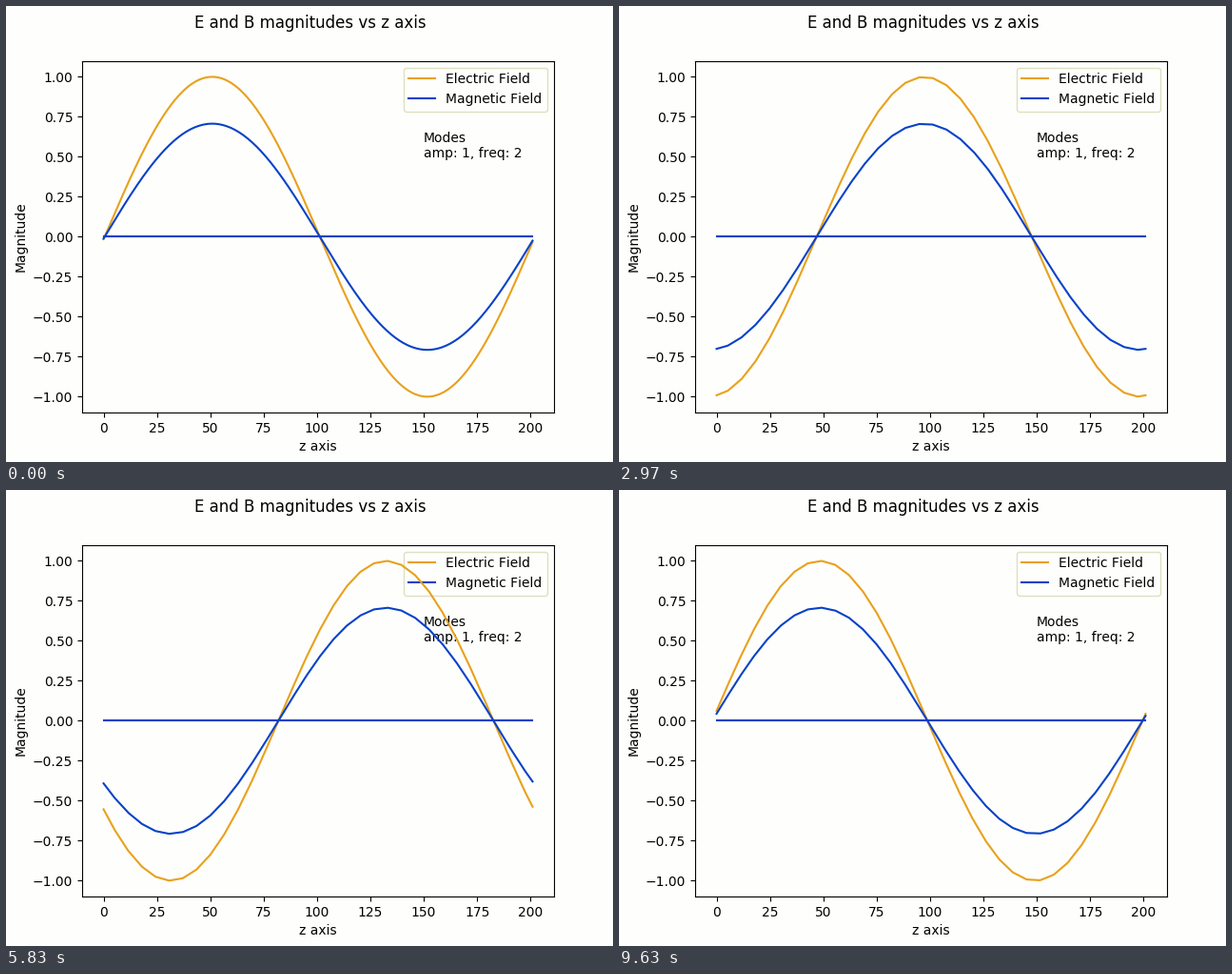
A matplotlib script that plays this animation: 638x479 px, repeating every 9.66 s.

```python
import numpy as np
import matplotlib.pyplot as plt
from matplotlib.animation import FuncAnimation
from matplotlib.lines import Line2D

W, H, DPI = 638, 479, 100
FRAMES, LOOP_MS = 290, 9660
PERIOD = 201.6       # wavelength along z
PITCH = 6.4          # spacing of the samples fed in at z = 0
PAPER, ORANGE, BLUE = "#fefefc", "#e8a11c", "#0842c8"

# Distance travelled by the wave, which drifts slightly in speed.
KEY_FRAMES = [0, 38, 89, 145, 205, 253, 289]
KEY_SHIFTS = [0.5, 109.7, 248.5, 401.4, 568.8, 702.0, 804.4]

# The starting wave is finely sampled, the incoming wave coarsely.
samples = np.concatenate([np.arange(-140, 0) * PITCH, np.arange(0, 203)])
wave = np.sin(2 * np.pi * samples / PERIOD)
z = np.linspace(0, 201, 805)

plt.rcParams["font.family"] = "DejaVu Sans"
plt.rcParams["text.kerning_factor"] = 6
fig = plt.figure(figsize=(W / DPI, H / DPI), dpi=DPI, facecolor=PAPER)
ax = fig.add_axes([80 / W, (H - 427.2) / H, 496 / W, 369.6 / H], facecolor=PAPER)
margin = 201 * 0.05
ax.set_xlim(-margin, 201 + margin)
ax.set_ylim(-1.1, 1.1)
ax.set_xticks(range(0, 201, 25))
ax.set_yticks(np.linspace(-1, 1, 9))
ax.set_xlabel("z axis")
ax.set_ylabel("Magnitude")
fig.suptitle("E and B magnitudes vs z axis", x=320 / W, y=1 - 8.6 / H)
ax.text(150, 0.494, "Modes\namp: 1, freq: 2")


def field(color, label, order):
    """Return a moving curve together with its resting zero line."""
    ax.plot([0, 201], [0, 0], color=color, lw=1.5, zorder=order)
    return ax.plot([], [], color=color, lw=1.5, label=label, zorder=order)[0]


electric = field(ORANGE, "Electric Field", 10)
magnetic = field(BLUE, "Magnetic Field", 11)

legend = ax.legend(loc="upper right", facecolor=PAPER, edgecolor="#d8d8b4")
legend.set_zorder(4)
fig.add_artist(Line2D([0, 1], [0.5 / H] * 2, color="#b0b0a8", lw=0.72))


def update(n):
    shift = np.interp(n, KEY_FRAMES, KEY_SHIFTS)
    e = np.interp(z - shift, samples, wave)
    electric.set_data(z, e)
    magnetic.set_data(z, e / np.sqrt(2))
    return electric, magnetic


anim = FuncAnimation(fig, update, frames=FRAMES, init_func=lambda: update(0),
                     interval=LOOP_MS / FRAMES, repeat=True, repeat_delay=0)
plt.show()
```
